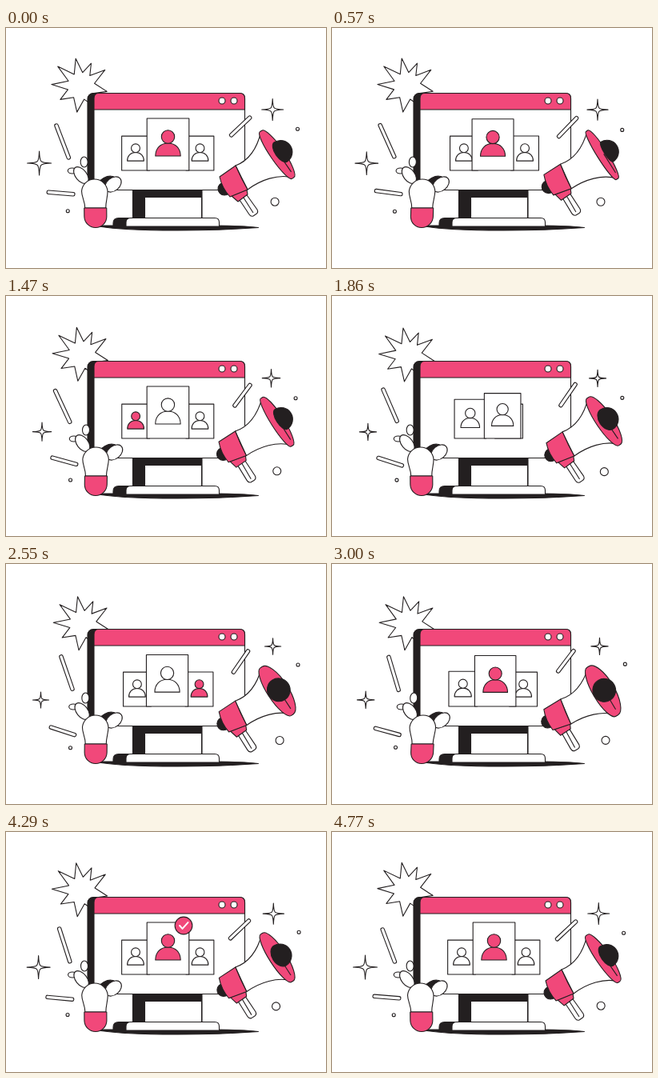
Animation, 400 px wide and 300 px high, one loop 4.8 s. Source, as an HTML page:

```html
<!DOCTYPE html>
<html lang="en">
<head>
<meta charset="utf-8">
<title>Choosing a candidate</title>
<style>
  html, body { margin: 0; width: 100%; height: 100%; overflow: hidden; background: #fff; }
  svg { display: block; width: 100vw; height: 100vh; }
  svg * { stroke-linejoin: round; }
  .w, .p, .k { stroke: #231f20; stroke-width: 1.1; }
  .w { fill: #fff; }
  .p { fill: #f1487a; }
  .k { fill: #231f20; }
  .line { fill: none; stroke: #231f20; stroke-width: 1.1; }
  .tick { fill: none; stroke: #fff; stroke-width: 2; stroke-linecap: round; }
</style>
</head>
<body>
<svg viewBox="0 0 400 300">
  <path id="burst" class="w"/>
  <path class="k" d="M112 247C140 254 240 255 315.500 249.500C300 247.500 280 247 262 247Z"/>

  <!-- monitor -->
  <path class="k" d="M158.500 202H245V238H158.500Z"/>
  <path class="w" d="M173.500 211.500H244.500V238H173.500Z"/>
  <path class="k" d="M134 248.500V244Q134 237.500 141 237.500H165V248.500Z"/>
  <path class="w" d="M150 248V243Q150 237.500 156 237.500H261Q266.500 237.500 266.500 243V248Z"/>
  <rect class="k" x="102" y="81.500" width="180" height="121" rx="7"/>
  <rect class="w" x="110" y="81.500" width="188.500" height="121" rx="6"/>
  <path class="p" d="M110 102V88Q110 81.500 116 81.500H292Q298.500 81.500 298.500 88V102Z"/>
  <circle class="w" cx="270" cy="91" r="4"/>
  <circle class="w" cx="285" cy="91" r="4"/>

  <g id="cards"></g>
  <g id="badge">
    <circle class="p" r="11"/>
    <path class="tick" d="M-5 0L-1.500 4L5.500 -4"/>
  </g>
  <path id="flash" class="w"/>
  <g id="floaters"></g>

  <!-- cactus bulb -->
  <g id="bulb">
    <ellipse class="k" cx="126" cy="194.500" rx="8" ry="13" transform="rotate(62 126 194.500)"/>
    <ellipse class="w" cx="134" cy="195.500" rx="8" ry="11.500" transform="rotate(50 134 195.500)"/>
    <ellipse class="w" cx="98" cy="167.500" rx="4.500" ry="6.500"/>
    <ellipse class="w" cx="83" cy="178.500" rx="5.500" ry="3.500"/>
    <ellipse class="w" cx="94" cy="184" rx="7" ry="12" transform="rotate(-38 94 184)"/>
    <path class="w" d="M98.500 225C98.500 216 94.500 212 94.500 204A16.300 16.300 0 0 1 127 204C127 212 124.500 216 124.500 225Z"/>
    <path class="p" d="M97.500 225H125.500V235.500A14 14 0 0 1 97.500 235.500Z"/>
  </g>

  <!-- megaphone -->
  <g id="horn">
    <circle class="k" cx="273" cy="201" r="8"/>
    <path class="w" d="M290 212L299 206L314 227Q316 231 312 233L309 235Q306 236 304 233Z"/>
    <path class="line" d="M295 209L309 231"/>
    <path class="p" d="M282 210L301 202L302 208L290 217Z"/>
    <path class="w" d="M287 172C303 166 314 150 319 129L359 187C340 182 318 190 302 202Z"/>
    <path class="p" d="M267 186L287 172Q294 188 302 202L280 211Q270 200 267 186Z"/>
    <g transform="translate(339 158) rotate(-34.600)">
      <path id="rim" class="p"/>
      <path class="line" d="M2 0V28"/>
      <path id="ball" class="k"/>
    </g>
  </g>
</svg>
<script>
const LOOP = 4800, RAD = Math.PI / 180;
const $ = id => document.getElementById(id);

function make(parent, tag, cls, attrs = {}) {
  const node = document.createElementNS('http://www.w3.org/2000/svg', tag);
  if (cls) node.setAttribute('class', cls);
  for (const k in attrs) node.setAttribute(k, attrs[k]);
  return parent.appendChild(node);
}
const move = (node, x, y, more = '') =>
  node.setAttribute('transform', `translate(${x} ${y}) ${more}`);

const clamp = v => Math.min(1, Math.max(0, v));
const mix = (a, b, p) => a + (b - a) * p;
const cubic = u => u < .5 ? 4 * u ** 3 : 1 - 4 * (1 - u) ** 3;
const ramp = (t, from, to) => cubic(clamp((t - from) / (to - from)));
const pop = u => 1 + 2.7 * (u - 1) ** 3 + 1.7 * (u - 1) ** 2;

// Smooth periodic curve through rows of [time, value, ...].
function curve(rows, t, col) {
  const n = rows.length;
  const at = i => {
    const lap = Math.floor(i / n), r = rows[i - lap * n];
    return [r[0] + lap * LOOP, r[col]];
  };
  let i = 0;
  while (i < n - 1 && rows[i + 1][0] <= t) i++;
  const [a, b, c, d] = [at(i - 1), at(i), at(i + 1), at(i + 2)];
  const span = c[0] - b[0], u = (t - b[0]) / span;
  const m0 = (c[1] - a[1]) / (c[0] - a[0]) * span;
  const m1 = (d[1] - b[1]) / (d[0] - b[0]) * span;
  return (2 * u ** 3 - 3 * u * u + 1) * b[1] + (u ** 3 - 2 * u * u + u) * m0
       + (3 * u * u - 2 * u ** 3) * c[1] + (u ** 3 - u * u) * m1;
}

const LEAN = [[0, -.01], [990, .05], [1860, -.01], [2550, .01], [3000, .045], [3810, .01]];
// time, x, y, turn, mouth opening
const HORN = [
  [0, 0, 0, 0, 8], [990, -2.5, -2.5, 4, 5], [1860, 1, -2, .5, 10],
  [2550, -.5, -.5, 1.5, 13], [3000, -1.5, -2, 4, 13.5], [3810, -1, -5, 4, 12]
];

function star(r, c) {
  const k = r * c;
  const arm = (sx, sy, end) => `C${sx * k} ${sy * k} ${sx * k} ${sy * k} ${end}`;
  return `M0 ${-r}` + arm(1, -1, `${r} 0`) + arm(1, 1, `0 ${r}`)
       + arm(-1, 1, `${-r} 0`) + arm(-1, -1, `0 ${-r}`) + 'Z';
}

// Uneven burst: angle and length of each spike.
const SPIKES = [[-101, 35], [-66, 31], [-34, 36], [12, 33], [55, 33],
                [99, 33], [147, 31], [183, 37], [220, 38]];
const polar = (a, r) => `${r * Math.cos(a * RAD)} ${r * Math.sin(a * RAD)}`;
$('burst').setAttribute('d', 'M' + SPIKES.map(([a, r], i) => {
  const next = i < SPIKES.length - 1 ? SPIKES[i + 1][0] : SPIKES[0][0] + 360;
  return polar(a, r) + 'L' + polar((a + next) / 2, 17);
}).join('L') + 'Z');

// Cards sit on their bottom centre.
const cards = ['p', 'w', 'w'].map(cls => {
  const g = make($('cards'), 'g');
  return {
    g,
    box: make(g, 'rect', 'w'),
    body: make(g, 'path', cls),
    head: make(g, 'circle', cls)
  };
});
const SLOTS = [162, 202.5, 242.5], SMALL = .66;

function drawCards(t) {
  let step = 0, p = 0;
  for (let k = 0; k < 3; k++) {
    const v = ramp(t, 415 + k * 1000, 1165 + k * 1000);
    if (v > 0) { step = k; p = v; }
  }
  const stretch = Math.sin(Math.PI * clamp((t - 3550) / 520)) ** 2;
  cards.forEach((card, i) => {
    // slot 0 left, 1 centre, 2 right; each step goes one to the left
    const from = (1 + i - step + 3) % 3, to = (from + 2) % 3;
    const x = mix(SLOTS[from], SLOTS[to], p);
    const s = from === 1 ? mix(1, SMALL, p)
            : from === 2 ? mix(SMALL, 1, p ** 1.6) : SMALL;
    const lift = i ? 0 : stretch;
    const set = (node, o) => { for (const k in o) node.setAttribute(k, o[k]); };
    card.order = from === 0 ? 0 : s;
    move(card.g, x, 178);
    set(card.box, { x: -26.3 * s, y: -65 * s, width: 52.6 * s, height: 65 * s });
    const w = 15.7 * s, low = -18 * s, top = -(34 + 5 * lift) * s;
    card.body.setAttribute('d',
      `M${-w} ${low}C${-w} ${mix(low, top, .6)} ${-w * .6} ${top} 0 ${top}` +
      `S${w} ${mix(low, top, .6)} ${w} ${low}Z`);
    set(card.head, { cy: -(42 + 4 * lift) * s, r: (8.2 - 1.7 * lift) * s });
  });
  const sorted = [...cards].sort((a, b) => a.order - b.order);
  sorted.forEach((c, i) => {
    if ($('cards').children[i] !== c.g) $('cards').insertBefore(c.g, $('cards').children[i]);
  });
}

const air = $('floaters');
const rod = len => make(air, 'rect', 'w', { x: -len / 2, y: -2.2, width: len, height: 4.4, rx: 2 });
const dot = r => make(air, 'circle', 'w', { r });
const rods = [rod(47), rod(35), rod(36)];
const dots = [dot(2), dot(5), dot(2)];
const stars = [make(air, 'path', 'w'), make(air, 'path', 'w')];

function drawFloaters(t) {
  const turn = t / LOOP * 360;
  const sin = (off = 0) => Math.sin((turn + off) * RAD);
  const cos = (off = 0) => Math.cos((turn + off) * RAD);
  const spin = a => `rotate(${a})`;

  move($('burst'), 95 - 1.2 * cos(-20), 73.8 - 1.4 * cos(-25));
  move(rods[0], 73 - 4.1 * sin(35), 139 + 3 * cos(), spin(69.5 - 5 * sin(5)));
  move(rods[1], 70 + 2.9 * sin(-30), 207.5 - 2 * sin(30), spin(11.5 - 7 * cos(12)));
  move(rods[2], 293.5 + 2 * sin(-10), 122.7 + 1.7 * sin(10), spin(-49.5 + 6.5 * cos(15)));
  move(dots[0], 364.5 - 2.6 * sin(), 126.3 + 1.6 * sin());
  move(dots[1], 339 - 3.2 * cos(-25), 218.8 - 1.7 * cos(-20));
  move(dots[2], 79 - 2 * cos(30), 229.3 + .8 * sin(-45));

  move(stars[0], 42.75 + 2.3 * sin(-30), 169.5 - .5 * cos());
  stars[0].setAttribute('d', star(12.5 + 2.5 * cos(), .04));
  move(stars[1], 333.2 - 1.8 * sin(), 102.5 - .5 * cos());
  stars[1].setAttribute('d', star(11.8 + 1.7 * cos(), .04));
}

function drawProps(t) {
  // lean sideways over the pot's foot
  const lean = curve(LEAN, t, 1);
  $('bulb').setAttribute('transform', `matrix(1 0 ${-lean} 1 ${lean * 250 + .5} 0)`);

  const [x, y, a, b] = [1, 2, 3, 4].map(c => curve(HORN, t, c));
  move($('horn'), x, y, `rotate(${a} 300 175)`);
  // blunt rim: two half ellipses joined by the edge thickness
  $('rim').setAttribute('d',
    `M-2 -35.500H1A${b} 35.500 0 0 1 1 35.500H-2A${b * .8} 35.500 0 0 1 -2 -35.500Z`);
  const r = 14.5, off = 10.5 - .65 * b;
  const back = Math.min(14, Math.max(1, (b - 3) * 1.4));
  $('ball').setAttribute('d',
    `M${off} ${-r}A${r} ${r} 0 0 1 ${off} ${r}A${back} ${r} 0 0 1 ${off} ${-r}Z`);
}

function drawReward(t) {
  const size = t < 4000 ? pop(clamp((t - 3300) / 350)) : 1 - ramp(t, 4250, 4550);
  const shown = t > 3300 && size > .01;
  $('badge').style.display = shown ? '' : 'none';
  move($('badge'), 222, 117, `scale(${shown ? size : 0})`);

  const r = 14 * ramp(t, 3400, 3750) * (1 - ramp(t, 3850, 4250));
  $('flash').style.display = r > .3 ? '' : 'none';
  move($('flash'), 140, 83);
  $('flash').setAttribute('d', star(r, .31));
}

function frame() {
  const t = performance.now() % LOOP;
  drawCards(t);
  drawFloaters(t);
  drawProps(t);
  drawReward(t);
  requestAnimationFrame(frame);
}
frame();
</script>
</body>
</html>
```
